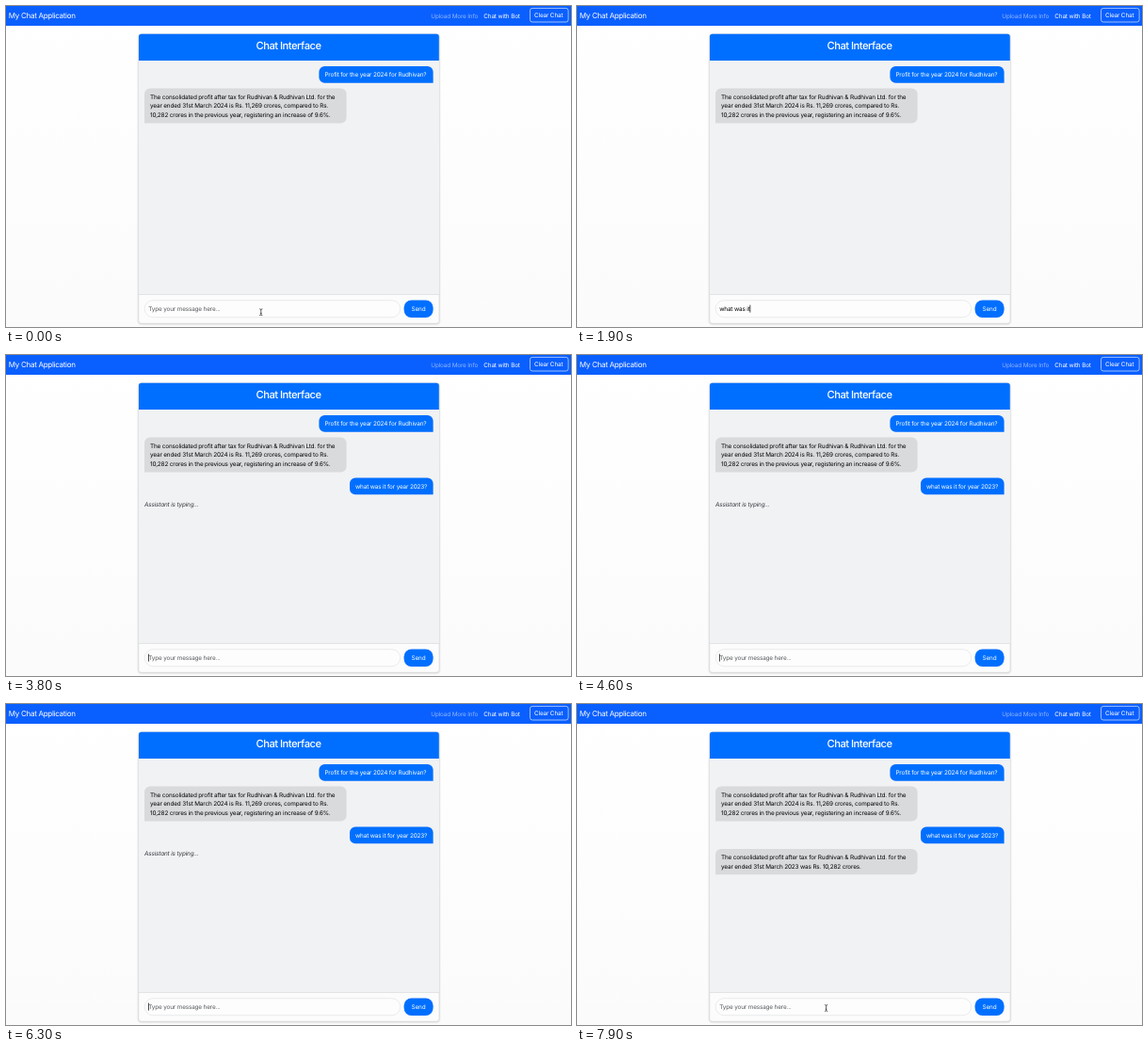
Animation of 600 by 341 pixels, one loop 8 s. Source, as an HTML page:

```html
<!DOCTYPE html>
<html lang="en">
<head>
<meta charset="utf-8">
<title>Chat Interface</title>
<style>
  html, body { margin: 0; width: 100%; height: 100%; overflow: hidden; background: #fdfdfd; }
  svg { display: block; width: 100vw; height: 100vh; }
  text {
    font: 6.4px Inter, "Liberation Sans", sans-serif;
    letter-spacing: -.024em;
    text-rendering: geometricPrecision;
    white-space: pre;
  }
  .brand { font-size: 8px; letter-spacing: -.036em; }
  .title { font-size: 11.2px; font-weight: 500; letter-spacing: -.045em; text-anchor: middle; }
  .light { fill: #fff; }
  .dim { fill: #fff; fill-opacity: .55; }
  .hint { fill: #565a5e; }
  .typing { fill: #34383c; font-style: italic; }
  .mine { fill: #006fff; }
  .bot { fill: #d9dadc; }
</style>
</head>
<body>
<svg viewBox="0 0 600 341" preserveAspectRatio="none">
  <defs>
    <linearGradient id="page" x2="0" y2="1">
      <stop offset="0" stop-color="#fff"/>
      <stop offset="1" stop-color="#fbfbfb"/>
    </linearGradient>
    <filter id="soft" x="-5%" y="-5%" width="110%" height="110%">
      <feGaussianBlur stdDeviation="1.3"/>
    </filter>
  </defs>
  <rect width="600" height="341" fill="url(#page)"/>

  <rect width="600" height="21" fill="#0a5fff"/>
  <text class="brand light" x="2.8" y="13.1">My Chat Application</text>
  <text class="dim" x="451.3" y="12.6">Upload More Info</text>
  <text class="light" x="507.3" y="12.6">Chat with Bot</text>
  <rect x="556.5" y="2.4" width="40.6" height="14.6" rx="2.4" fill="none" stroke="#fff" stroke-width=".6"/>
  <text class="light" x="561" y="12.1">Clear Chat</text>

  <rect x="140.6" y="30.4" width="319.6" height="307.6" rx="3" fill="#000" opacity=".2" filter="url(#soft)"/>
  <rect x="140.8" y="29.6" width="319.2" height="307.6" rx="3" fill="#fcfcfc" stroke="#cfd0d2" stroke-width=".5"/>
  <path class="mine" d="M141 58V32.6a2.8 2.8 0 0 1 2.8-2.8H457a2.8 2.8 0 0 1 2.8 2.8V58z"/>
  <text class="title light" x="300" y="46.3">Chat Interface</text>
  <rect x="141" y="58" width="318.8" height="248.2" fill="#f1f2f4"/>
  <rect x="141" y="306" width="318.8" height=".6" fill="#d3d4d6"/>

  <g id="chat"></g>

  <rect x="147.1" y="312.7" width="271.6" height="18" rx="9" fill="#fdfdfd" stroke="#d6d8da" stroke-width=".5"/>
  <text id="hint" class="hint" x="151.2" y="324.1">Type your message here...</text>
  <text id="entry" x="151.2" y="324.1" xml:space="preserve"></text>
  <rect id="caret" y="317.6" width=".7" height="8" fill="#000"/>
  <rect class="mine" x="422.6" y="312.4" width="31" height="18.6" rx="8"/>
  <text class="light" x="430.6" y="324.1">Send</text>
  <path id="mouse" d="M-1.6-3.4Q0-3.4 0-2.5Q0-3.4 1.6-3.4M0-2.5V2.5M-1.6 3.4Q0 3.4 0 2.5Q0 3.4 1.6 3.4M-.8 1.2H.8" fill="none" stroke="#222" stroke-width=".7"/>
</svg>
<script>
const LOOP = 8000, SENT = 3800, REPLY = 6700;
const QUESTION = "what was it for year 2023?";
const NAME = "Rudhivan";
const $ = id => document.getElementById(id);
const chat = $("chat"), hint = $("hint"), entry = $("entry"), caret = $("caret"), mouse = $("mouse");

function add(parent, tag, attrs, text = "") {
  const el = document.createElementNS("http://www.w3.org/2000/svg", tag);
  for (const key in attrs) el.setAttribute(key, attrs[key]);
  el.textContent = text;
  return parent.appendChild(el);
}

// Rounded box with one square bottom corner, on the speaker's side.
function bubble(mine, x, y, w, lines) {
  const g = add(chat, "g", {});
  const h = 8 + 9.6 * lines.length, r = 6;
  const br = mine ? 0 : r, bl = mine ? r : 0;
  add(g, "path", {
    class: mine ? "mine" : "bot",
    d: `M${x + r} ${y}h${w - 2 * r}a${r} ${r} 0 0 1 ${r} ${r}v${h - r - br}` +
       `a${br} ${br} 0 0 1 ${-br} ${br}h${br + bl - w}` +
       `a${bl} ${bl} 0 0 1 ${-bl} ${-bl}v${r + bl - h}a${r} ${r} 0 0 1 ${r} ${-r}z`
  });
  lines.forEach((line, i) => add(g, "text", {
    class: mine ? "light" : "", x: x + 6, y: y + 11.2 + 9.6 * i
  }, line));
  return g;
}

const opening = `The consolidated profit after tax for ${NAME} & ${NAME} Ltd. for the`;
bubble(true, 332.4, 64.1, 121.2, [`Profit for the year 2024 for ${NAME}?`]);
bubble(false, 147, 87.6, 214.6, [
  opening,
  "year ended 31st March 2024 is Rs. 11,269 crores, compared to Rs.",
  "10,282 crores in the previous year, registering an increase of 9.6%."
]);
const asked = bubble(true, 365, 130.6, 88.6, [QUESTION]);
const typing = add(chat, "text", { class: "typing", x: 147, y: 161.2 }, "Assistant is typing...");
const answer = bubble(false, 147, 154, 214.6, [opening, "year ended 31st March 2023 was Rs. 10,282 crores."]);

// Bursts of typing: first key time, gap, number of keys.
const bursts = [[700, 130, 4], [1300, 100, 13], [2700, 100, 1], [2900, 80, 8]];

const typed = t => bursts.reduce((sum, [from, gap, count]) =>
  sum + Math.max(0, Math.min(count, Math.floor((t - from) / gap) + 1)), 0);

function caretOn(t) {
  if (t < 400 || t >= 7250) return false;
  if (t < SENT) return !(t >= 1200 && t < 1300) && t < 3600;
  const phase = t % 1000;
  return phase >= 250 && phase < 850;
}

function mouseAt(t) {
  if (t < 700) return [270.8, 325.2];
  if (t < 7200) return null;
  const p = Math.min(1, (t - 7200) / 600), e = p * p * (3 - 2 * p);
  return [270.8 - 6.2 * e, 325.2 - 2.2 * e];
}

const show = (el, on) => el.setAttribute("visibility", on ? "visible" : "hidden");

function draw(t) {
  const count = t < SENT ? typed(t) : 0;
  entry.textContent = QUESTION.slice(0, count);
  show(hint, !count);
  show(caret, caretOn(t));
  caret.setAttribute("x", 151.1 + (count ? entry.getComputedTextLength() : 0));
  show(asked, t >= SENT);
  show(typing, t >= SENT && t < REPLY);
  show(answer, t >= REPLY);
  const spot = mouseAt(t);
  show(mouse, spot);
  if (spot) mouse.setAttribute("transform", `translate(${spot})`);
}

const start = performance.now();
function tick() {
  draw((performance.now() - start) % LOOP);
  requestAnimationFrame(tick);
}
tick();
</script>
</body>
</html>
```
